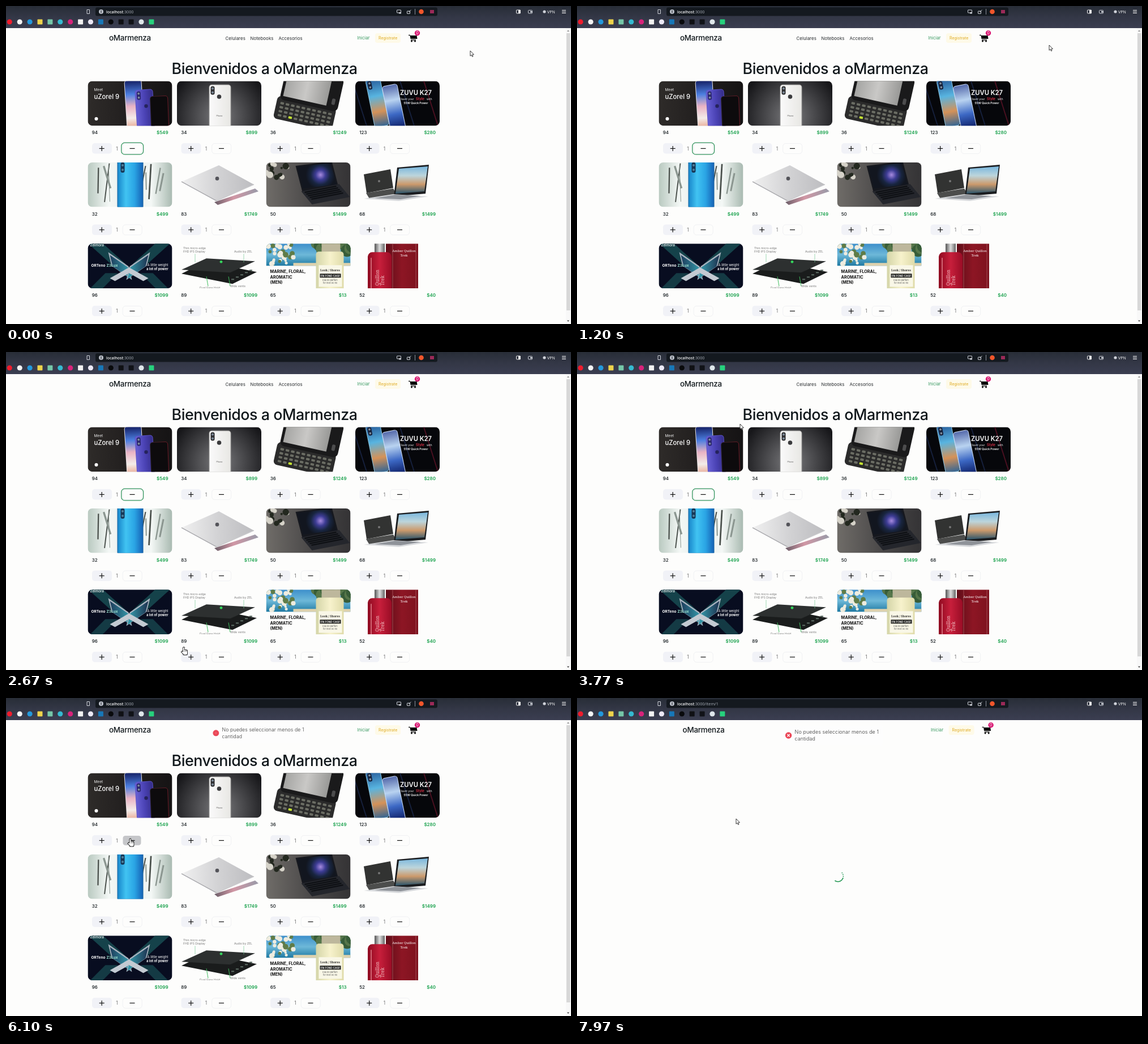
Recreate the animation shown at these times as an HTML page with a canvas. Size 998x561 px, loop 8000 ms.

```html
<!DOCTYPE html>
<html lang="es">
<head>
<meta charset="utf-8">
<title>Tienda</title>
<style>
html, body { margin: 0; width: 100%; height: 100%; overflow: hidden; background: #fdfdfc; }
canvas { display: block; }
</style>
</head>
<body>
<canvas id="stage" width="998" height="561"></canvas>
<script>
const c = document.getElementById('stage').getContext('2d');
const LOOP = 8000, PRESS = 5800, TOAST = 5895, TAP = 7270, LEAVE = 7380;
const BRAND = 'oMarmenza';
const UI = 'Inter, sans-serif', SERIF = 'Noto Serif, serif', CHROME = 'Open Sans, sans-serif';
const GREEN = '#16a04a', INK = '#11181c', PAGE = '#fdfdfc';
const clamp = v => Math.max(0, Math.min(1, v));

// drawing helpers
function rect(fill, x, y, w, h, r = 0) {
  c.fillStyle = fill;
  c.beginPath(); c.roundRect(x, y, w, h, r); c.fill();
}
function frame(color, x, y, w, h, r, lw = 1) {
  c.strokeStyle = color; c.lineWidth = lw;
  c.beginPath(); c.roundRect(x, y, w, h, r); c.stroke();
}
function circ(fill, x, y, r) {
  c.fillStyle = fill;
  c.beginPath(); c.arc(x, y, r, 0, 7); c.fill();
}
function line(color, lw, x1, y1, x2, y2) {
  c.strokeStyle = color; c.lineWidth = lw;
  c.beginPath(); c.moveTo(x1, y1); c.lineTo(x2, y2); c.stroke();
}
// parallelogram from a corner and two edge vectors
function quad(fill, x, y, ux, uy, vx, vy) {
  c.save(); c.transform(ux, uy, vx, vy, x, y); c.beginPath(); c.rect(0, 0, 1, 1); c.restore();
  c.fillStyle = fill; c.fill();
}
function tri(fill, x, y, w, h) {
  c.fillStyle = fill;
  c.beginPath(); c.moveTo(x - w / 2, y); c.lineTo(x + w / 2, y); c.lineTo(x, y + h); c.fill();
}
function text(s, x, y, size, color, o = {}) {
  c.font = `${o.w || 400} ${size}px ${o.f || UI}`;
  c.textAlign = o.a || 'left';
  c.letterSpacing = (o.ls || 0) + 'px';
  c.fillStyle = color;
  c.fillText(s, x, y);
}
function stops(g, cols) {
  cols.forEach((k, i) => g.addColorStop(i / (cols.length - 1), k));
  return g;
}
const across = (x, w, ...cols) => stops(c.createLinearGradient(x, 0, x + w, 0), cols);
const down = (y, h, ...cols) => stops(c.createLinearGradient(0, y, 0, y + h), cols);
const glow = (x, y, r, ...cols) => stops(c.createRadialGradient(x, y, 0, x, y, r), cols);
function at(x, y, draw, angle = 0, scale = 1) {
  c.save(); c.translate(x, y); c.rotate(angle); c.scale(scale, scale); draw(); c.restore();
}
function seeded(s) {
  return () => (s = s * 16807 % 2147483647) / 2147483647;
}
function bezier(x1, y1, x2, y2) {
  const f = (a, b, s) => 3 * a * s * (1 - s) ** 2 + 3 * b * s * s * (1 - s) + s ** 3;
  return x => {
    let lo = 0, hi = 1;
    for (let i = 0; i < 24; i++) {
      const m = (lo + hi) / 2;
      f(x1, x2, m) < x ? lo = m : hi = m;
    }
    return f(y1, y2, lo);
  };
}
const ease = bezier(.25, .1, .25, 1);
const enter = bezier(.21, 1.02, .73, 1);
const pop = bezier(.175, .885, .32, 1.275);

// product pictures
const W = 149, H = 78.7;
const fill = k => rect(k, 0, 0, W, H);
// upright phone around its centre, with optional camera pill
function phone(x, y, w, h, angle, skin, edge, cam) {
  at(x, y, () => {
    rect(edge, -w / 2, -h / 2, w, h, 5);
    rect(skin, -w / 2 + 1, -h / 2 + 1, w - 2, h - 2, 4);
    if (!cam) return;
    rect(cam, -w / 2 + 3, -h / 2 + 3, 7, 15, 3);
    for (const d of [7, 14]) circ('#7d8b9a', -w / 2 + 6.5, -h / 2 + d, 1.9);
  }, angle);
}
function column(lines, x, y, size, step, color, o) {
  lines.split('|').forEach((s, i) => text(s, x, y + i * step, size, color, o));
}
const pictures = [
  () => {
    fill(across(0, W, '#2e2b29', '#211e1e', '#151314'));
    phone(82, 42, 31, 88, -.06, down(-40, 84, '#1b2b73', '#4c7fe0', '#e9b3c4', '#f3ece9', '#e79a80'), '#e6e2e4');
    phone(101, 52, 32, 75, -.06, across(-16, 32, '#6a62d6', '#4a42b4', '#332c85'), '#5a53c4', '#2c2870');
    circ('#25235c', 103, 44, 3.2);
    phone(127, 64, 32, 76, -.04, '#0d0b0d', across(-16, 32, '#2a2226', '#6b1a26'));
    text('Meet', 11, 17.5, 6.5, '#eee');
    text('uZorel 9', 11, 31, 11.3, '#fff', { w: 500 });
    circ('#fff', 15, 66.5, 3);
  },
  () => {
    fill(glow(75, 62, 88, '#7a7a7d', '#48484b', '#17171a'));
    phone(76, 50, 39, 88, 0, across(-19, 38, '#fafafa', '#e8e7e4'), '#9c9b99', '#2f2f31');
    circ('#3a3a3c', 74.5, 27.5, 3.8);
    text('Phone', 75, 62, 3.6, '#555', { a: 'center' });
  },
  () => {
    fill(PAGE);
    at(24, 30, () => {
      rect('#2b2b2b', -4, -4, 106, 41, 7);
      for (let i = 0; i < 40; i++)
        rect(i == 32 ? '#c5e332' : '#6b6d64', 3 + i % 10 * 9.6, 6 + Math.floor(i / 10) * 7.2, 6.5, 4, 1.5);
      rect('#1a1a1b', 0, -58, 104, 60, 8);
      rect(across(4, 78, '#a4a4a2', '#c9c8c6', '#9a9a98'), 5, -52, 78, 47);
      rect('#4c4c4d', 91, -20, 6, 11, 2);
    }, .22);
  },
  () => {
    fill('#06070b');
    for (let i = 0; i < 4; i++) line(i % 2 ? '#4a1020' : '#16203c', 2, i * 42 - 5, 0, i * 42 + 20, H);
    phone(39, 38, 27, 86, -.2, down(-40, 84, '#2b63a0', '#58b4e0', '#d59258', '#2b6296'), '#8cc3dd', '#15203a');
    phone(68, 46, 28, 80, -.2, down(-38, 76, '#5a6fae', '#b9d3f0', '#3c68c4', '#0e1f66'), '#cddcf4');
    text('ZUVU K27', 107, 24, 11.2, '#fff', { w: 600, a: 'center' });
    text('Flaunt your', 78, 33, 4.8, '#eee');
    text('Style', 107, 33.5, 6, '#dd2f45', { w: 600 });
    text('with', 126, 33, 4.8, '#eee');
    text('55W Quick Power', 107, 40.5, 5, '#fff', { w: 600, a: 'center' });
  },
  () => {
    const rnd = seeded(11);
    fill(across(0, W, '#b9c9c0', '#f4f8f6', '#e6ece9', '#f4f8f6', '#a9bab1'));
    for (let i = 0; i < 9; i++) {
      const x = i % 2 ? rnd() * 46 : 102 + rnd() * 44;
      line(i < 4 ? '#4b514d' : '#8b9690', 1 + rnd() * 2.5, x, rnd() * 20, x + rnd() * 30 - 15, 45 + rnd() * 34);
    }
    phone(75, 36, 46, 100, 0, across(-23, 46, '#1683c8', '#41c3f2', '#2aa4e4', '#1560b4'), '#16639f');
    rect('#173857', 58, 0, 7, 18, 3);
    for (const y of [5, 13]) circ('#4f819c', 61.5, y, 2);
  },
  () => {
    fill(PAGE);
    quad(across(60, 80, '#5a545e', '#d197a5', '#9e9aa8'), 66, 70, 72, -24, 6, 5);
    quad(across(8, 130, '#f0f0f0', '#d2d2d4', '#bcbcbf'), 8, 34, 66, -29, 62, 34);
    line('#a9a9ad', 1.5, 8, 34, 70, 68);
    line('#c9c9cc', 1.5, 70, 68, 136, 39);
    circ('#54545a', 71, 28.5, 3.3);
  },
  () => {
    const rnd = seeded(5);
    fill(across(0, W, '#6f6c68', '#4c4a4a', '#343335'));
    for (let i = 0; i < 16; i++) circ(i % 3 ? '#23281f' : '#d5d2c8', rnd() * 42, rnd() * 28, 2 + rnd() * 4);
    quad('#16181e', 52, 6, 64, -8, 12, 46);
    quad(glow(96, 22, 26, '#a78be0', '#3d3c94', '#18253f', '#12161f'), 55, 8, 59, -7, 10, 38);
    quad('#24262c', 62, 51, 67, -13, 19, 23);
    for (let i = 0; i < 5; i++) line('#0e1014', 2.2, 68 + i * 3, 53 + i * 3, 124 + i * 3, 42 + i * 3);
  },
  () => {
    fill(PAGE);
    quad('#323332', 15, 21, 47, -9, 5, 33);
    quad('#4c4d4c', 19, 54, 48, -8, 6, 10);
    circ('#777', 42, 33, 2);
    quad('#1b1d20', 74, 9, 56, -5, -6, 51);
    quad(down(8, 46, '#7db8dd', '#bcd5dc', '#cc9a6c', '#33586c'), 77, 11, 51, -4, -6, 44);
    quad('#d6d8db', 15, 64, 52, -8, 62, 4);
    quad('#8f9399', 34, 63, 36, -6, 46, 2);
  },
  () => {
    fill('#080d20');
    for (const s of [-1, 1]) {
      quad('#15424a', 73 + s * 46, 0, s * 26, 0, s * -40, 36);
      quad('#143a44', 73 + s * 20, 52, s * 22, 0, s * 30, 30);
      quad('#aab4c0', 73 + s, 40, s * 36, -25, s * -6, 24);
      quad(across(36, 74, '#1b3555', '#3599aa', '#1b2948'), 73 + s * 2, 42, s * 32, -22, s * -5, 20);
      quad('#c3cad2', 73, 42, s * 34, 19, s * -9, 5);
    }
    text('Zelmora', 4, 5, 6.2, '#fff', { w: 500 });
    text('ORTeno', 6, 41, 6.5, '#fff', { w: 700 });
    text('Z3Lux', 33, 41, 6.5, '#9be4d0', { w: 700 });
    text('A little weight', 142, 40, 5.8, '#fff', { a: 'right' });
    text('a lot of power', 142, 46.5, 5.8, '#fff', { w: 700, a: 'right' });
  },
  () => {
    fill(PAGE);
    quad('#1a1c1c', 8, 53, 90, 18, 43, -21);
    quad('#2d3030', 8, 46, 44, -20, 86, 5);
    for (let i = 0; i < 5; i++) rect('#5d6c65', 96 + i * 8, 62 - i * 4, 5, 2);
    circ('#35d45c', 78, 32, 2.4);
    for (const x of [52, 91]) line('#3cbb5b', 1, x, 58, x + 3, 75);
    for (const x of [32, 118]) line('#76c996', .7, x, 18, x, 33);
    column('Thin micro-edge|FHD IPS Display', 11, 10, 5.1, 6, '#777');
    text('Audio by ZEL', 101, 15.5, 5.1, '#777');
    text('Wide vents', 94, 77, 5.1, '#777');
    text('Dual Fans Hold', 40, 80, 5.1, '#777');
  },
  () => {
    const rnd = seeded(3);
    fill(PAGE);
    rect(down(0, 39, '#3d8fcb', '#6db8d8', '#1f7aa3'), 0, 0, W, 39);
    for (let i = 0; i < 14; i++) circ(i % 2 ? '#375c38' : '#56764a', 88 + i * 5, rnd() * 16, 7 + rnd() * 5);
    for (let i = 0; i < 34; i++) circ(i % 3 ? '#eeecdf' : '#5f7c48', rnd() * 48, rnd() * 36, 2 + rnd() * 3);
    rect('#ded2ae', 48, 34, 101, 5);
    rect('#bdb79c', 98, -4, 33, 19, 2);
    rect(across(88, 50, '#d4d5a8', '#f7f2cc', '#dedaa8'), 88, 14, 49, 72, 5);
    rect('#f9f7e7', 93, 38, 41, 38);
    text('Look / Shores', 113, 49, 5.2, '#333', { w: 600, a: 'center', f: SERIF });
    rect('#20211e', 95, 53, 37, 7);
    text('EN FOND CASE', 113.5, 58.5, 4.6, '#fff', { w: 600, a: 'center' });
    column('Eau de parfum|for men 90 ml', 113, 66, 3.8, 5, '#555', { a: 'center' });
    column('MARINE, FLORAL,|AROMATIC|(MEN)', 7, 52, 7.2, 9.3, '#111', { w: 700 });
  },
  () => {
    fill(PAGE);
    rect(across(54, 57, '#5f0d18', '#8d1624', '#7d121e'), 54, 0, 57, H);
    for (const x of [66, 107]) line('#b5656c', .7, x, 0, x, H);
    column('Amber Quillon|Trek', 86, 15, 5.9, 8, '#fff', { a: 'center', f: SERIF, w: 500 });
    rect(across(34, 18, '#555', '#ddd', '#666'), 34, -2, 18, 19, 2);
    rect(across(22, 42, '#8f0a20', '#c71f3b', '#9a0d26'), 22, 15, 42, 71, 8);
    line('rgba(255,180,185,.7)', 1.5, 28, 25, 28, H);
    at(42, 74, () => column('Quillon|Trek', 0, 0, 8, 9, '#efc1c3', { f: SERIF }), -Math.PI / 2);
  }
];
const items = ('94 $549,34 $899,36 $1249,123 $280,32 $499,83 $1749,50 $1499,68 $1499,' +
  '96 $1099,89 $1099,65 $13,52 $40').split(',').map(s => s.split(' '));
const cardX = i => 144.5 + i % 4 * 157.5;
const cardY = i => 132.5 + Math.floor(i / 4) * 143.4;
const inside = (p, x, y, w, h) => p.x >= x && p.x <= x + w && p.y >= y && p.y <= y + h;

const marks = ('o#f01d2d o#f4f4f4 o#2499dc s#eed34b s#75c7a8 o#35bad0 o#d8237b s#f2f2f2 ' +
  'o#ece9f7 s#1878b8 o#090a0c s#101114 s#111317 o#dfe7ea s#27d17d').split(' ');

function chrome(loading) {
  rect(down(0, 39, '#282d37', '#333746', '#3b3e51'), 0, 0, 998, 39);
  rect('#14191f', 158, 2.5, 604, 15, 3);
  const k = '#cfd2d9';
  frame(k, 143, 6.5, 4.5, 7, 0);
  circ('#b9bec7', 168, 10, 4);
  rect('#14191f', 167.5, 7.5, 1, 5);
  text('localhost', 177, 12.6, 6.9, '#f5f6f7', { f: CHROME, w: 600 });
  text(loading ? ':3000/item/1' : ':3000', 207, 12.6, 7.2, '#a9afb8', { f: CHROME });
  frame(k, 690.5, 7, 7, 5, .5);
  rect(k, 694, 11, 4, 2.5);
  frame(k, 708.5, 9, 5, 4.5, .5);
  line(k, 1, 711, 11, 715.5, 7);
  rect('#8b909a', 722, 5, 1, 10);
  circ('#f0562b', 733.5, 10, 4.3);
  rect('#9b2a58', 749, 7, 7, 6);
  frame('#eee', 901.5, 7, 7, 6, 1);
  rect('#eee', 905, 7, 4, 6);
  frame(k, 922.5, 7.5, 7, 5.5, 1);
  rect(k, 926, 9, 4, 2.5);
  circ(k, 951, 10, 2.6);
  text('VPN', 956, 12.5, 7, '#fff', { f: CHROME });
  for (let i = 0; i < 3; i++) rect('#eee', 982, 7 + i * 2.5, 7, 1);
  marks.forEach((m, i) => {
    const x = 6.3 + i * 17.9, k = m.slice(1);
    m[0] == 's' ? rect(k, x - 4.5, 23.5, 9, 9, 1) : circ(k, x, 28, 4.6);
  });
}

function header(loading) {
  text(BRAND, 182, 61, 13.4, INK, { w: 500, ls: -.25 });
  if (!loading) {
    text('Celulares', 387.5, 60, 7.8, '#25292c', { ls: .1 });
    text('Notebooks', 431.5, 60, 7.8, '#25292c', { ls: .1 });
    text('Accesorios', 481.5, 60, 7.8, '#25292c', { ls: .1 });
  }
  text('Iniciar', 620.3, 59.2, 7.8, '#3b9a62');
  rect('#fefae8', 652, 48, 45, 17, 4);
  text('Registrate', 658, 59, 7, '#dfaa20');
  line('#111', 1.4, 711, 51.5, 714, 51.5);
  quad('#080808', 713.5, 52, 12, 0, 1, 6);
  line('#111', 1.4, 715, 59.8, 724, 59.8);
  for (const x of [716.5, 722.5]) circ('#080808', x, 62, 1.5);
  circ('#d8126f', 726.5, 47.7, 4.7);
  text('0', 726.5, 50.4, 7.3, '#fff', { a: 'center' });
}

function card(i, t, p) {
  const x = cardX(i), y = cardY(i), [id, price] = items[i];
  c.save();
  c.translate(x, y);
  if (!i && t > TAP) {
    const s = 1 - .013 * clamp((t - TAP) / 50);
    c.translate(W / 2, 66); c.scale(s, s); c.translate(-W / 2, -66);
  }
  c.save();
  c.beginPath(); c.roundRect(0, 0, W, H, 8); c.clip();
  pictures[i]();
  c.restore();
  text(id, 7.3, 93.7, 8, INK, { w: 500 });
  text(price, 142, 93.7, 8, GREEN, { w: 600, a: 'right' });
  rect('#f1f2f7', 7.5, 109.5, 35, 18.5, 5);
  rect('#111', 20.2, 118.3, 9, 1.2);
  rect('#111', 24.1, 114.4, 1.2, 9);
  text('1', 51.5, 122, 8.5, '#444', { a: 'center', w: 300 });
  if (inside(p, x + 61, y + 109, 35, 19)) {
    const s = t > PRESS && t < 6160 ? .94 : 1;
    at(78, 118.9, () => rect('#c5c6c9', -17, -9, 34, 18, 4.5), 0, s);
  } else if (i || t < PRESS) frame('#f0f1f3', 61.7, 110, 34, 18, 5);
  if (!i && t < PRESS) frame('#35955f', 59.3, 108.6, 38.8, 20.8, 6, 1.3);
  rect('#111', 74, 118.3, 9, 1.2);
  c.restore();
}

function toast(t) {
  const age = t - TOAST, e = enter(clamp(age / 350));
  c.save();
  c.globalAlpha = .5 + .5 * e;
  c.translate(446, 66 - 70 * (1 - e));
  c.scale(.6 + .4 * e, .6 + .4 * e);
  rect('#fdfdfd', -89, -17.5, 178, 35, 4);
  column('No puedes seleccionar menos de 1|cantidad', -66, -2.6, 8.9, 11.8, '#363636', { w: 300, ls: .12 });
  at(-77, 0, () => circ('#ea4455', 0, 0, 5.7), 0, pop(clamp((age - 100) / 300)));
  at(-77, 0, () => {
    for (const s of [-2.2, 2.2]) line('#fff', 1.4, -s, -2.2, s, 2.2);
  }, 0, clamp((age - 150) / 200));
  c.restore();
}

function spinner(t) {
  const k = (t - LEAVE) / 800 % 1, R = Math.PI / 180;
  const ring = (turn, half, dash) => {
    const mid = 90 + 360 * turn;
    c.setLineDash(dash);
    c.beginPath(); c.arc(461, 314.5, 9.4, (mid - half) * R, (mid + half) * R); c.stroke();
    c.setLineDash([]);
  };
  c.strokeStyle = '#209650'; c.lineWidth = 1.6;
  ring(ease(k), 52, []);
  ring(k, 40, [1.5, 1.7]);
}

function scrollbar() {
  rect('#f8f8f8', 989, 39, 9, 522);
  rect('#d8d8d8', 990, 48, 6.5, 489);
  tri('#888', 993, 45, 4, -2.5);
  tri('#444', 993, 554.5, 4, 2.5);
}

// key points of the pointer: time, x, y
const path = [[0, 820, 79], [1200, 834, 69], [1650, 834, 69], [2600, 314, 521], [2950, 314, 521],
  [3770, 288, 127], [4850, 288, 127], [5300, 219.5, 248.5], [6470, 219.5, 248.5],
  [7150, 244, 198], [7400, 244, 198], [7850, 281, 213], [LOOP, 281, 213]];
function pointer(t) {
  const i = path.findIndex(q => q[0] > t), a = path[i - 1], b = path[i];
  const u = (t - a[0]) / (b[0] - a[0]), s = u * u * (3 - 2 * u);
  return { x: a[1] + (b[1] - a[1]) * s, y: a[2] + (b[2] - a[2]) * s };
}
function arrow() {
  const tip = new Path2D('M0 0V9.2L2.1 7.4L3.6 10.5L5 9.8L3.6 6.9L6.4 6.6Z');
  c.fillStyle = '#fff'; c.fill(tip);
  c.strokeStyle = '#222'; c.lineWidth = .9; c.stroke(tip);
}
function hand() {
  for (const [k, g] of [['#222', .9], ['#fff', 0]]) {
    rect(k, -1 - g, -g, 2 + 2 * g, 9 + 2 * g, 1.5);
    rect(k, -1 - g, 5 - g, 7 + 2 * g, 8 + 2 * g, 2);
    at(-3.6, 7.6, () => rect(k, -g, -1 - g, 6 + 2 * g, 2 + 2 * g, 1), .7);
  }
  for (let x = 1.2; x < 5; x += 1.7) line('#555', .6, x, 5.5, x, 8);
}

function draw(t) {
  const loading = t >= LEAVE, p = pointer(t);
  rect(PAGE, 0, 0, 998, 561);
  chrome(loading);
  c.save();
  c.beginPath(); c.rect(0, 39, 998, 522); c.clip();
  c.save();
  if (loading) c.translate(4.6, 0);
  header(loading);
  if (!loading) {
    text('Bienvenidos a ' + BRAND, 292.5, 119.8, 26.8, INK, { w: 500, ls: -.45 });
    items.forEach((_, i) => card(i, t, p));
  }
  if (t > TOAST) toast(t);
  c.restore();
  loading ? spinner(t) : scrollbar();
  c.restore();
  const over = !loading && items.some((_, i) => inside(p, cardX(i), cardY(i), W, 133));
  at(p.x, p.y, over ? hand : arrow);
}
function tick() {
  draw(performance.now() % LOOP);
  requestAnimationFrame(tick);
}
tick();
</script>
</body>
</html>
```
